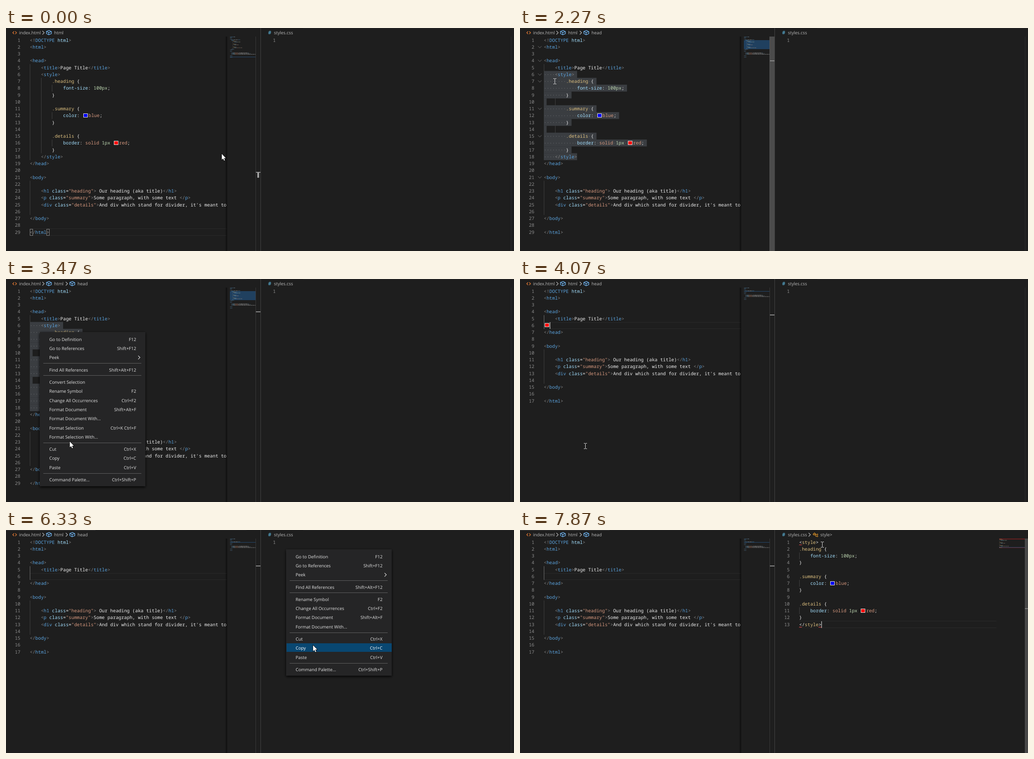
An HTML page with a canvas for the animation above (8 s loop, 1130x496 px).

```html
<!DOCTYPE html>
<html lang="en">
<head>
<meta charset="utf-8">
<title>Moving styles to a separate file</title>
<style>
  html, body { margin: 0; width: 100%; height: 100%; overflow: hidden; background: #1e1e1e; }
  canvas { display: block; width: 1130px; height: 496px; }
</style>
</head>
<body>
<canvas id="stage"></canvas>
<script>
const W = 1130, H = 496, LOOP = 8000, FPS = 15;
const CW = 6.168, LH = 15.25, SWATCH = 13.3;
const MONO = '500 10.28px "Noto Sans Mono", "DejaVu Sans Mono", monospace';
const UI = '500 9.8px "Open Sans", "Noto Sans", sans-serif';
const LEFT = 53, RIGHT = 621;
const COLORS = {
  g: '#868686', b: '#5ba3de', l: '#a4e0ff', o: '#d6987e',
  w: '#ececec', y: '#dec07f', n: '#bdd6b0'
};

const canvas = document.getElementById('stage');
const dpr = window.devicePixelRatio || 1;
canvas.width = W * dpr;
canvas.height = H * dpr;
const ctx = canvas.getContext('2d', { alpha: false });

// Each line: indent, then segments whose first letter is a colour key ("s" = colour swatch).
const topLines = [
  'g<!|bDOCTYPE|w |lhtml|g>',
  'g<|bhtml|g>',
  '',
  'g<|bhead|g>',
  '    g<|btitle|g>|wPage Title|g</|btitle|g>'
];
const styleLines = [
  '    g<|bstyle|g>',
  '        y.heading |w{',
  '            lfont-size|w: |n100px|w;',
  '        w}',
  '',
  '        y.summary |w{',
  '            lcolor|w: |s#0000ff|oblue|w;',
  '        w}',
  '',
  '        y.details |w{',
  '            lborder|w: |osolid |n1px |s#ff0000|ored|w;',
  '        w}',
  '    g</|bstyle|g>'
];
const restLines = [
  'g</|bhead|g>',
  '',
  'g<|bbody|g>',
  '',
  '    g<|bh1 |lclass|w=|o"heading"|g>|w Our heading (aka title)|g</|bh1|g>',
  '    g<|bp |lclass|w=|o"summary"|g>|wSome paragraph, with some text |g</|bp|g>',
  '    g<|bdiv |lclass|w=|o"details"|g>|wAnd div which stand for divider, it\'s meant to divide',
  '',
  'g</|bbody|g>',
  '',
  'g</|bhtml|g>'
];
const dedent = s => s.slice(Math.min(8, s.search(/\S|$/)))
  .replace(/g(<\/?)\|bstyle\|g>/, 'w$1|ystyle|w>');

function parse(src) {
  const indent = src.search(/\S|$/);
  const segs = src.trimStart().split('|').filter(Boolean).map(s => ({ key: s[0], text: s.slice(1) }));
  const plain = ' '.repeat(indent) + segs.filter(s => s.key !== 's').map(s => s.text).join('');
  return { indent, segs, plain, swatches: segs.filter(s => s.key === 's').length };
}
const before = {
  lines: [...topLines, ...styleLines, ...restLines].map(parse),
  guides: [[0, 5, 18], [4, 7, 17], [8, 8, 8], [8, 12, 12], [8, 16, 16], [0, 22, 26]]
};
const after = {
  lines: [...topLines, '', ...restLines].map(parse),
  guides: [[0, 5, 6, '#707070'], [0, 10, 14]]
};
const pasted = {
  lines: styleLines.map(dedent).map(parse),
  guides: [[0, 3, 3], [0, 7, 7], [0, 11, 11]]
};
const blank = { lines: [parse('')], guides: [] };

// Mouse path: time, x, y
const path = [
  [0, 480, 280], [70, 480, 280], [530, 8, 300], [930, 127, 287], [1000, 127, 287],
  [1800, 53, 103], [2270, 77, 118], [2660, 77, 118], [3070, 130, 181], [3470, 142, 363],
  [3670, 145, 371], [4070, 145, 371], [4730, 651, 165], [4870, 626, 104], [5270, 626, 43],
  [5730, 626, 43], [6330, 683, 256], [6470, 687, 274], [7070, 687, 274], [7530, 675, 35],
  [7800, 675, 35], [7866, 672, 32], [8000, 672, 32]
];
const clamp = (v, a, b) => Math.max(a, Math.min(b, v));
const ramp = (t, a, b) => clamp((t - a) / (b - a), 0, 1);
const rowY = n => 27 + (n - 1) * LH;

function mouseAt(t) {
  const i = Math.max(1, path.findIndex(p => p[0] > t));
  const [a, b] = [path[i - 1], path[i]];
  const k = ramp(t, a[0], b[0]);
  return { x: a[1] + (b[1] - a[1]) * k, y: a[2] + (b[2] - a[2]) * k };
}

function rect(x, y, w, h, color) {
  ctx.fillStyle = color;
  ctx.fillRect(x, y, w, h);
}
function text(s, x, y, color, font = UI, align = 'left') {
  ctx.font = font;
  ctx.textAlign = align;
  ctx.fillStyle = color;
  ctx.fillText(s, x, Math.round(y + 3.5));
}
function line(points, color, width = 1, close = false) {
  ctx.beginPath();
  points.forEach(([x, y]) => ctx.lineTo(x, y));
  if (close) ctx.closePath();
  ctx.strokeStyle = color;
  ctx.lineWidth = width;
  ctx.stroke();
}
const chevron = (x, y, color, s = 4) =>
  line([[x, y - s], [x + s, y], [x, y + s]], color, 1.2);

function swatch(x, y, color) {
  x = Math.round(x);
  y = Math.round(y);
  rect(x, y - 5, 10, 9, '#eeeeee');
  rect(x + 1, y - 4, 8, 7, color);
}
const caret = (x, n) => rect(Math.round(x), Math.round(rowY(n) - 7.4), 1.5, 15, '#aeafad');

function activeLine(x, w, n) {
  rect(x, Math.round(rowY(n) - 7.6), w, 1, '#2a2a2a');
  rect(x, Math.round(rowY(n) + 6.6), w, 1, '#2a2a2a');
}

function selection(lines, sel) {
  for (let n = sel.line; n <= 18; n++) {
    const l = lines[n - 1];
    const from = n === sel.line ? sel.col : 0;
    const width = (l.plain.length - from) * CW + l.swatches * SWATCH + (n < 18 ? CW : 0);
    rect(LEFT + from * CW, rowY(n) - 7.7, width, LH + 0.1, '#3a3d41');
    [...l.plain].forEach((c, i) => {
      if (c === ' ' && i >= from) rect(LEFT + (i + 0.4) * CW, rowY(n) - 0.2, 1.2, 1.2, '#6e7073');
    });
  }
}

function editor(doc, x0, clipX, sel, swatches = true) {
  doc.lines.forEach((_, i) => text(i + 1, x0 - 21, rowY(i + 1), '#8c8c8c', MONO, 'right'));
  ctx.save();
  ctx.beginPath();
  ctx.rect(x0 - 1, 0, clipX - x0 + 1, H);
  ctx.clip();
  doc.guides.forEach(([col, a, b, color = '#404040']) =>
    rect(Math.round(x0 + col * CW), rowY(a) - 7.6, 1, (b - a + 1) * LH, color));
  if (sel) selection(doc.lines, sel);
  doc.lines.forEach((l, i) => {
    const y = rowY(i + 1);
    let x = x0 + l.indent * CW;
    for (const s of l.segs) {
      if (s.key !== 's') {
        text(s.text, x, y, COLORS[s.key], MONO);
        x += s.text.length * CW;
      } else if (swatches) {
        swatch(x + 1.6, y, s.text);
        x += SWATCH;
      }
    }
  });
  ctx.restore();
}

function minimap(doc, x0, w, from, to) {
  const pitch = 1.61;
  const y0 = Math.round(19 + (from - 1) * pitch);
  const h = Math.round((to - from + 1) * pitch * 0.95);
  rect(x0, y0, w, Math.max(1, from === to ? 1 : h), from === to ? '#24486c' : '#20405f');
  ctx.save();
  ctx.beginPath();
  ctx.rect(x0, 19, w, 60);
  ctx.clip();
  ctx.globalAlpha = 0.5;
  doc.lines.forEach((l, i) => {
    let x = x0 + l.indent * 0.8;
    l.segs.filter(s => s.key !== 's').forEach(s => {
      for (const c of s.text) {
        if (c !== ' ') rect(x, 19.3 + i * pitch, 0.75, 1, COLORS[s.key]);
        x += 0.8;
      }
    });
  });
  ctx.restore();
}

function cube(x, y) {
  const c = '#75beff';
  line([[x, y - 3], [x + 6, y - 5], [x + 11, y - 2.5], [x + 11, y + 2], [x + 5, y + 4.5], [x, y + 2]], c, 1.2, true);
  line([[x, y - 3], [x + 5, y - 0.5], [x + 11, y - 2.5]], c, 1.2);
  line([[x + 5, y - 0.5], [x + 5, y + 4.5]], c, 1.2);
}
function classIcon(x, y) {
  const c = '#ee9d28';
  line([[x, y - 1], [x + 3, y - 4], [x + 5.5, y - 2], [x + 2.5, y + 1]], c, 1.1, true);
  line([[x + 4.5, y - 0.5], [x + 8, y - 0.5]], c);
  line([[x + 5.5, y - 0.5], [x + 5.5, y + 3.5], [x + 8, y + 3.5]], c);
  [-0.5, 3.5].forEach(d =>
    line([[x + 8, y + d], [x + 9.7, y + d - 1.7], [x + 11, y + d], [x + 9.3, y + d + 1.5]], c, 1, true));
}

function breadcrumbs(t) {
  const y = 10.5, grey = '#b8b8b8';
  line([[18, y - 3], [15, y], [18, y + 3]], '#e37933', 1.3);
  line([[20.5, y - 3], [23.5, y], [20.5, y + 3]], '#e37933', 1.3);
  text('index.html', 29, y, grey);
  const crumbs = [['html', 81]];
  if (t >= 1050) crumbs.push(['head', 133]);
  if (t >= 1050 && t < 1930) crumbs.push(['style', 187]);
  crumbs.forEach(([s, x]) => {
    chevron(x, y, grey);
    cube(x + 9, y);
    text(s, x + 26, y, grey);
  });
  text('#', 583, y, '#519aba', 'bold 11px "Open Sans", sans-serif');
  text('styles.css', 596, y, grey);
  if (t >= 7060) {
    chevron(642, y, grey);
    classIcon(652, y);
    text('style>', 668, y, grey);
  }
}

const nav = [['Go to Definition', 'F12'], ['Go to References', 'Shift+F12'], ['Peek', '>'], null,
  ['Find All References', 'Shift+Alt+F12'], null];
const edit = [['Rename Symbol', 'F2'], ['Change All Occurrences', 'Ctrl+F2'],
  ['Format Document', 'Shift+Alt+F'], ['Format Document With...', '']];
const clip = [null, ['Cut', 'Ctrl+X'], ['Copy', 'Ctrl+C'], ['Paste', 'Ctrl+V'], null,
  ['Command Palette...', 'Ctrl+Shift+P']];
const selectionMenu = [...nav, ['Convert Selection', ''], ...edit,
  ['Format Selection', 'Ctrl+K Ctrl+F'], ['Format Selection With...', ''], ...clip];
const plainMenu = [...nav, ...edit, ...clip];

function menu(items, x, y, h, mouse) {
  ctx.save();
  ctx.shadowColor = '#000';
  ctx.shadowBlur = 6 * dpr;
  ctx.shadowOffsetY = 1.5 * dpr;
  rect(x, y, 235, h, '#252526');
  ctx.restore();
  let cy = y + 16.4;
  for (const item of items) {
    if (!item) {
      rect(x + 8, Math.floor(cy - 7.7), 218, 1, '#606060');
      cy += 6.85;
      continue;
    }
    const hot = Math.abs(mouse.y - cy) < 9.8;
    const color = hot ? '#ffffff' : '#e2e2e2';
    if (hot) rect(x + 1, Math.floor(cy - 10.2), 234, 19, '#094771');
    text(item[0], x + 21.2, cy - 0.2, color);
    if (item[1] === '>') chevron(x + 219, cy - 0.5, color);
    else text(item[1], x + 214.5, cy - 0.2, color, UI, 'right');
    cy += 20.35;
  }
}

function pointer({ x, y }, arrow) {
  if (arrow) {
    const shape = [[0, 0], [0, 13], [3, 10.3], [5, 15], [7, 14.2], [5, 9.6], [9, 9.4]]
      .map(([dx, dy]) => [x + dx, y + dy]);
    line(shape, '#000', 1.4, true);
    ctx.fillStyle = '#fff';
    ctx.fill();
    return;
  }
  x = Math.round(x);
  y = Math.round(y);
  rect(x, y - 5, 1, 11, '#e0e0e0');
  [-6, 6].forEach(d => {
    rect(x - 3, y + d, 3, 1, '#e0e0e0');
    rect(x + 1, y + d, 3, 1, '#e0e0e0');
  });
}

function squiggle(x, y, w) {
  const pts = [];
  for (let d = 0; d <= w; d += 1.5) pts.push([x + d, y + (d / 1.5 % 2 ? -1 : 1)]);
  line(pts, '#f14c4c');
}

function leftPane(t, mouse) {
  const cut = t >= 4060;
  const doc = cut ? after : before;
  let sel = null;
  if (!cut && t >= 1060) {
    sel = { line: 6, col: 0 };
    if (t < 1790) {
      sel.line = clamp(Math.round((mouse.y - 27) / LH) + 1, 6, 18);
      sel.col = clamp(Math.round((mouse.x - LEFT) / CW), 0, doc.lines[sel.line - 1].plain.length);
    }
  }
  const current = cut ? 6 : sel ? sel.line : 29;
  if (!sel) activeLine(LEFT, 438, current);
  editor(doc, LEFT, 491, sel);

  if (!cut && !sel) {
    const y = Math.round(rowY(29) - 7) + 0.5;
    ctx.strokeStyle = '#888';
    ctx.lineWidth = 1;
    [0, 6].forEach(c => ctx.strokeRect(Math.round(LEFT + c * CW) + 0.5, y, 6, 14));
    if (t % 1000 >= 500) caret(LEFT + 7 * CW, 29);
  }
  if (cut) {
    const stale = t < 4390;
    if (stale) swatch(55, rowY(6), '#ff0000');
    if (t < 5190 && (t - 4060) % 1000 < 500) caret(stale ? 66 : LEFT, 6);
  }
  const fold = 0.75 * ramp(t, 400, 600) * (1 - ramp(t, 2500, 2640));
  if (fold > 0) {
    ctx.globalAlpha = fold;
    [2, 4, 6, 7, 11, 15, 21].forEach(n => {
      const y = rowY(n);
      line([[40, y - 2], [44, y + 2], [48, y - 2]], '#8a8a8a');
    });
    ctx.globalAlpha = 1;
  }

  const shade = ctx.createLinearGradient(487, 0, 492, 0);
  shade.addColorStop(0, 'rgba(0,0,0,0)');
  shade.addColorStop(1, 'rgba(0,0,0,.55)');
  rect(487, 19, 5, H - 19, shade);
  minimap(doc, 498, 57, current, sel ? 18 : current);

  rect(555, 19, 1, H - 19, '#393939');
  const bar = Math.max(ramp(t, 70, 300) * (1 - ramp(t, 2560, 2740)),
    ramp(t, 4130, 4330) * (1 - ramp(t, 4640, 4870)));
  rect(555, 19, 11, H - 19, `rgba(121,121,121,${0.5 * bar})`);
  const mark = Math.round(18 + (current - 1) * (cut ? 12.2 : 10.78));
  rect(556, mark, 10, 2, '#8c8c8c');
  if (!cut && !sel) rect(559, mark + 1, 4, 12, '#a0a0a0');
}

function rightPane(t) {
  const full = t >= 6790;
  const doc = full ? pasted : blank;
  if (full) activeLine(RIGHT, 439, 13);
  editor(doc, RIGHT, 1060, null, t >= 7790);
  rect(1123, 19, 1, H - 19, '#2d2d2d');
  if (!full) {
    if (t >= 5190 && t < 5690) caret(RIGHT, 1);
    return;
  }
  if ((t - 6790) % 1000 < 500) caret(RIGHT + 8 * CW, 13);
  minimap(doc, 1066, 57, 13, 13);
  rect(1123, 19, 7, H - 19, 'rgba(121,121,121,.45)');
  rect(1123, 174, 7, 1.5, '#8c8c8c');
  if (t >= 7060) {
    squiggle(RIGHT, rowY(1) + 6, 6);
    squiggle(RIGHT, rowY(13) + 6, 6);
    squiggle(RIGHT + 7 * CW, rowY(13) + 6, 6);
    rect(1066, 19.5, 57, 1, '#b02020');
    rect(1066, 39, 57, 1, 'rgba(190,40,40,.5)');
  }
}

function draw(t) {
  ctx.setTransform(dpr, 0, 0, dpr, 0, 0);
  ctx.textRendering = 'geometricPrecision';
  const mouse = mouseAt(t);
  rect(0, 0, W, H, '#1e1e1e');
  rect(0, 0, 535, 1, '#272727');
  rect(661, 0, 469, 1, '#272727');
  if (t >= 5190) rect(0, 0, 199, 1, '#3c3c3c');
  leftPane(t, mouse);
  rightPane(t);
  rect(566, 0, 1, H, '#444444');
  breadcrumbs(t);
  const first = t >= 2520 && t < 4060;
  const second = t >= 5720 && t < 6790;
  if (first) menu(selectionMenu, 75, 118, 343, mouse);
  if (second) menu(plainMenu, 623, 43, 281, mouse);
  pointer(mouse, first || second || t < 60 || mouse.x < 50);
}

// The picture advances in steps of 1/15 s.
let start;
function frame(now) {
  start ??= now;
  const tick = Math.floor(((now - start) % LOOP + 4) * FPS / 1000);
  draw(Math.min(tick * 1000 / FPS, LOOP - 1));
  requestAnimationFrame(frame);
}
requestAnimationFrame(frame);
</script>
</body>
</html>
```
